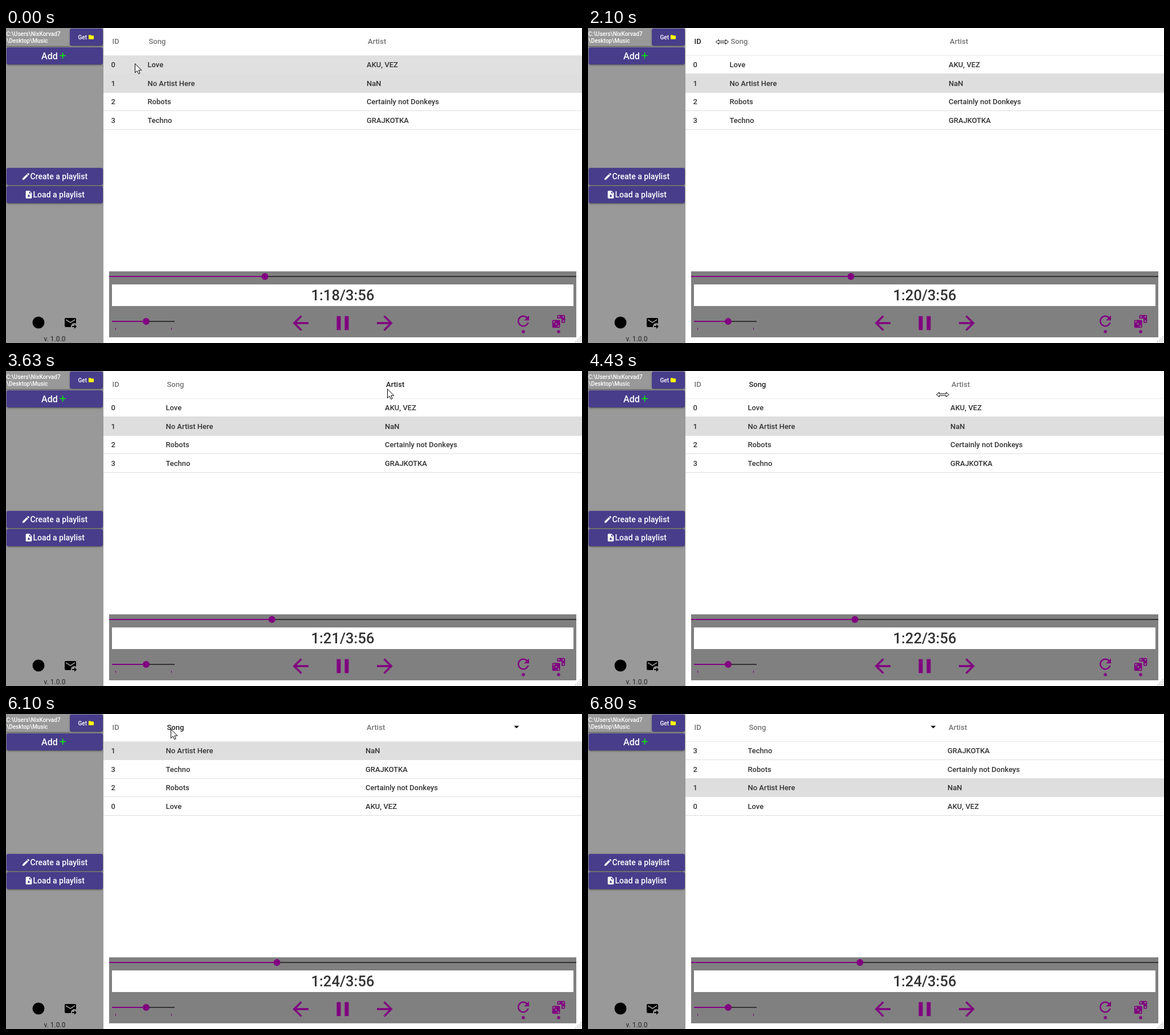
An HTML page that plays this animation: 1011 by 554 pixels, repeating every 6.86 s.

```html
<!DOCTYPE html>
<html lang="en">
<head>
<meta charset="utf-8">
<title>Music player</title>
<style>
html, body { margin: 0; width: 100%; height: 100%; overflow: hidden; background: #fff; }
svg, aside, .btn { position: absolute; left: 0; top: 0; }
aside { width: 171px; height: 554px; background: #999; }
.btn {
  left: 1px; width: 169px; height: 30px; border-radius: 3px; background: #483d8b;
  box-shadow: 0 3px 1px -2px rgba(0,0,0,.2), 0 2px 2px rgba(0,0,0,.14), 0 1px 5px rgba(0,0,0,.12);
}
text { font-family: Roboto, Arial, sans-serif; font-weight: 500; font-size: 13px; white-space: pre; }
.w { fill: #fff; }
.dark { fill: #333; }
.p { fill: #800080; }
</style>
</head>
<body>
<aside>
  <div class="btn" style="left:112px;top:1px;width:58px"></div>
  <div class="btn" style="top:34px"></div>
  <div class="btn" style="top:246px"></div>
  <div class="btn" style="top:278px"></div>
</aside>
<svg width="1011" height="554" viewBox="0 0 1011 554">
  <g id="table"></g>

  <text class="w" x="0.5" y="14" style="font-size:10px">C:\Users\NixKorvad7</text>
  <text class="w" x="1" y="26" style="font-size:10px">\Desktop\Music</text>
  <rect y="32" width="112" height="1" opacity=".4"/>
  <text class="w" x="126.5" y="20" style="font-size:10px">Get</text>
  <text class="w" x="62" y="55" style="font-size:16px">Add</text>
  <text class="w" x="42.5" y="266" style="font-size:14px">Create a playlist</text>
  <text class="w" x="47.5" y="298" style="font-size:14px">Load a playlist</text>
  <circle cx="57" cy="518" r="10.5"/>
  <text x="85.5" y="551" text-anchor="middle" fill="#222" style="font-size:12px;font-weight:400">v. 1.0.0</text>

  <rect x="181" y="428" width="820" height="116" fill="#808080"/>
  <rect class="dark" x="181" y="436" width="820" height="2"/>
  <rect id="played" class="p" x="181" y="436" height="2"/>
  <circle id="thumb" class="p" cy="437" r="6"/>
  <rect class="w" x="186" y="451" width="810" height="38"/>
  <text id="clock" class="dark" x="591" y="479" text-anchor="middle" style="font-size:25.6px"></text>
  <rect class="dark" x="186" y="515" width="110" height="2"/>
  <rect class="p" x="186" y="515" width="60" height="2"/>
  <circle class="p" cx="246" cy="516" r="6"/>
  <path d="M192.5 527v4M290.5 527v4" stroke="#800080"/>
  <circle class="p" cx="908" cy="534" r="2.8"/>
  <circle class="p" cx="970" cy="534" r="2.8"/>
  <g id="icons"></g>
  <g id="grip" fill="#b5b5b5"></g>

  <g id="cursor" fill="#fff" stroke="#000">
    <path id="arrow" d="M.5 .7V16.6L4.2 13.2L6.6 18.6L9.1 17.5L6.8 12.2H11.8Z"/>
    <path id="resize" d="M-10.5 .5l5 -4v2.5h12v-2.5l5 4l-5 4v-2.5h-12v2.5Z"/>
  </g>
</svg>
<script>
const LOOP = 6860;
const $ = id => document.getElementById(id);

function set(el, attrs) {
  for (const k in attrs) el.setAttribute(k, attrs[k]);
}
function add(parent, tag, attrs, text) {
  const el = document.createElementNS('http://www.w3.org/2000/svg', tag);
  set(el, attrs);
  if (text) el.textContent = text;
  return parent.appendChild(el);
}

// Icons on a 24-unit grid
function icon(x, y, size, fill, d, flip = 1) {
  add($('icons'), 'path', {
    d, fill, 'fill-rule': 'evenodd',
    transform: `translate(${x} ${y}) scale(${flip * size / 24} ${size / 24})`
  });
}
const pip = (x, y) => `M${x - 1.2} ${y}a1.2 1.2 0 1 0 2.4 0a1.2 1.2 0 1 0 -2.4 0Z`;
const purple = '#800080';
const arrow = 'M20 11V13H8L13.5 18.5L12.08 19.92L4.16 12L12.08 4.08L13.5 5.5L8 11Z';
icon(144, 10.5, 11, '#ff0', 'M10 4H4a2 2 0 0 0-2 2V18a2 2 0 0 0 2 2H20a2 2 0 0 0 2-2V8a2 2 0 0 0-2-2H12Z');
icon(90.5, 39.5, 18, '#0f0', 'M19 13H13V19H11V13H5V11H11V5H13V11H19Z');
icon(27, 253, 16, '#fff', 'M20.7 7a1 1 0 0 0 0-1.4L18.4 3.3a1 1 0 0 0-1.4 0L15.1 5.1L18.9 8.9ZM3 17.25V21H6.75L17.8 9.9L14.1 6.2Z');
icon(32, 285, 16, '#fff', 'M14 2H6a2 2 0 0 0-2 2V20a2 2 0 0 0 2 2H18a2 2 0 0 0 2-2V8ZM12 19L8 15H10.5V12H13.5V15H16ZM13 9V3.5L18.5 9Z');
icon(101, 506, 24, '#000', 'M20 4H4a2 2 0 0 0-2 2V18a2 2 0 0 0 2 2h9v-1a6 6 0 0 1 9-5.2V6a2 2 0 0 0-2-2ZM20 8l-8 5l-8-5V6l8 5l8-5ZM19 15l4 4l-4 4v-3h-4v-2h4Z');
icon(496, 498, 42, purple, arrow);
icon(686, 498, 42, purple, arrow, -1);
icon(570, 498, 42, purple, 'M14 19H18V5H14ZM6 19H10V5H6Z');
icon(893, 500.5, 30, purple, 'M17.65 6.35A8 8 0 1 0 19.73 14H17.65A6 6 0 1 1 16.22 7.78L13 11H20V4Z');
icon(955, 501, 30, purple, 'M11 3H20l1 1V13l-1 1H16V8H10V4ZM4 10H13l1 1V20l-1 1H4l-1-1V11Z' +
  pip(12.4, 5.4) + pip(18.6, 5.4) + pip(18.6, 11.5) + [0, 1, 2].map(i => pip(5.4 + 3.1 * i, 12.4 + 3.1 * i)).join(''));

for (let r = 0; r < 4; r++)
  for (let c = 0; c <= r; c++)
    add($('grip'), 'rect', { x: 1008 - 3 * c, y: 542 + 3 * r, width: 1.6, height: 1.6 });

// Table
const songs = [
  ['0', 'Love', 'AKU, VEZ'],
  ['1', 'No Artist Here', 'NaN'],
  ['2', 'Robots', 'Certainly not Donkeys'],
  ['3', 'Techno', 'GRAJKOTKA']
];
const table = $('table');
const lineY = i => Math.round(47.5 + 32.6 * i);
const bands = songs.map((_, i) =>
  add(table, 'rect', { x: 171, y: lineY(i), width: 840, height: lineY(i + 1) - lineY(i) }));
for (let i = 0; i <= songs.length; i++)
  add(table, 'rect', { x: 171, y: lineY(i), width: 840, height: 1, fill: i ? '#dedede' : '#e8e8e8' });
const cells = songs.map(song => song.map(s => add(table, 'text', { class: 'dark' }, s)));
const heads = ['ID', 'Song', 'Artist'].map(s => add(table, 'text', { y: 28 }, s));
const sortMark = add(table, 'path', { fill: '#111' });

// Pointer stops: time, x, y
const stops = [
  [30, 226, 62], [430, 222, 24], [1070, 218, 28], [1500, 187, 24], [1770, 187, 24],
  [2100, 235, 24], [2370, 225, 26], [2830, 254, 32], [3200, 257, 32], [3630, 669, 31],
  [3970, 651, 39], [4430, 622, 41], [4570, 617, 41], [4650, 664, 27], [5470, 650, 27],
  [5830, 262, 25], [6060, 289, 26], [6500, 289, 26], [6790, 330, 556]
];
// Header clicks: time, column, direction
const clicks = [[0, 0, 1], [4830, 2, 1], [5250, 2, -1], [6230, 1, 1], [6430, 1, -1]];

function pointer(t) {
  const i = stops.findIndex(s => s[0] > t);
  const b = stops[i < 0 ? stops.length - 1 : i];
  const a = i > 0 ? stops[i - 1] : b;
  const p = a === b ? 0 : (t - a[0]) / (b[0] - a[0]);
  const e = p * p * (3 - 2 * p);
  return [1, 2].map(n => a[n] + (b[n] - a[n]) * e);
}

// Distance the pointer has pulled between pressing and releasing
function drag(t, press, release) {
  const held = Math.min(Math.max(t, press), release);
  return Math.round(pointer(held)[0] - pointer(press)[0]);
}

function draw(t) {
  const [x, y] = pointer(t);
  const d1 = drag(t, 2370, 3200);
  const cols = [184.5, 248.5 + d1, 633 + d1 + drag(t, 3970, 4570)];
  const inHead = y < 48;
  const onEdge = inHead && cols.slice(1).some(c => x > c - 26 && x < c - 4);
  const hot = inHead && t > 1070 ? cols.filter((c, i) => !i || x >= c - 4).length - 1 : -1;

  const [, key, dir] = clicks.filter(c => c[0] <= t).pop();
  const sorted = [...songs].sort((a, b) => dir * a[key].localeCompare(b[key], 'en'));

  heads.forEach((h, i) => set(h, { x: cols[i] + 2, fill: i === hot ? '#212121' : '#737373' }));
  sorted.forEach((song, i) => {
    const id = songs.indexOf(song);
    const over = y > lineY(i) && y < lineY(i + 1);
    set(bands[i], { fill: id === 1 ? '#dedede' : over ? '#e0e0e0' : '#fff' });
    cells[id].forEach((c, n) => set(c, { x: cols[n], y: Math.round(69 + 32.6 * i) }));
  });
  const markX = 316 + 290 * key;
  set(sortMark, { d: key ? `M${markX - 4.5} ${23 - 2.3 * -dir}h9l-4.5 ${-4.6 * dir}Z` : '' });

  // The player refreshes about twice a second
  const tick = Math.max(0, Math.floor((t + 87) / 507));
  const pos = 454.5 + tick * 1.75;
  set($('thumb'), { cx: pos });
  set($('played'), { width: pos - 181 });
  $('clock').textContent = `1:${18 + Math.floor(tick / 2)}/3:56`;

  set($('cursor'), { transform: `translate(${Math.round(x)} ${Math.round(y)})` });
  $('arrow').style.display = onEdge ? 'none' : '';
  $('resize').style.display = onEdge ? '' : 'none';
}

const start = performance.now();
function frame() {
  draw((performance.now() - start) % LOOP);
  requestAnimationFrame(frame);
}
frame();
</script>
</body>
</html>
```
